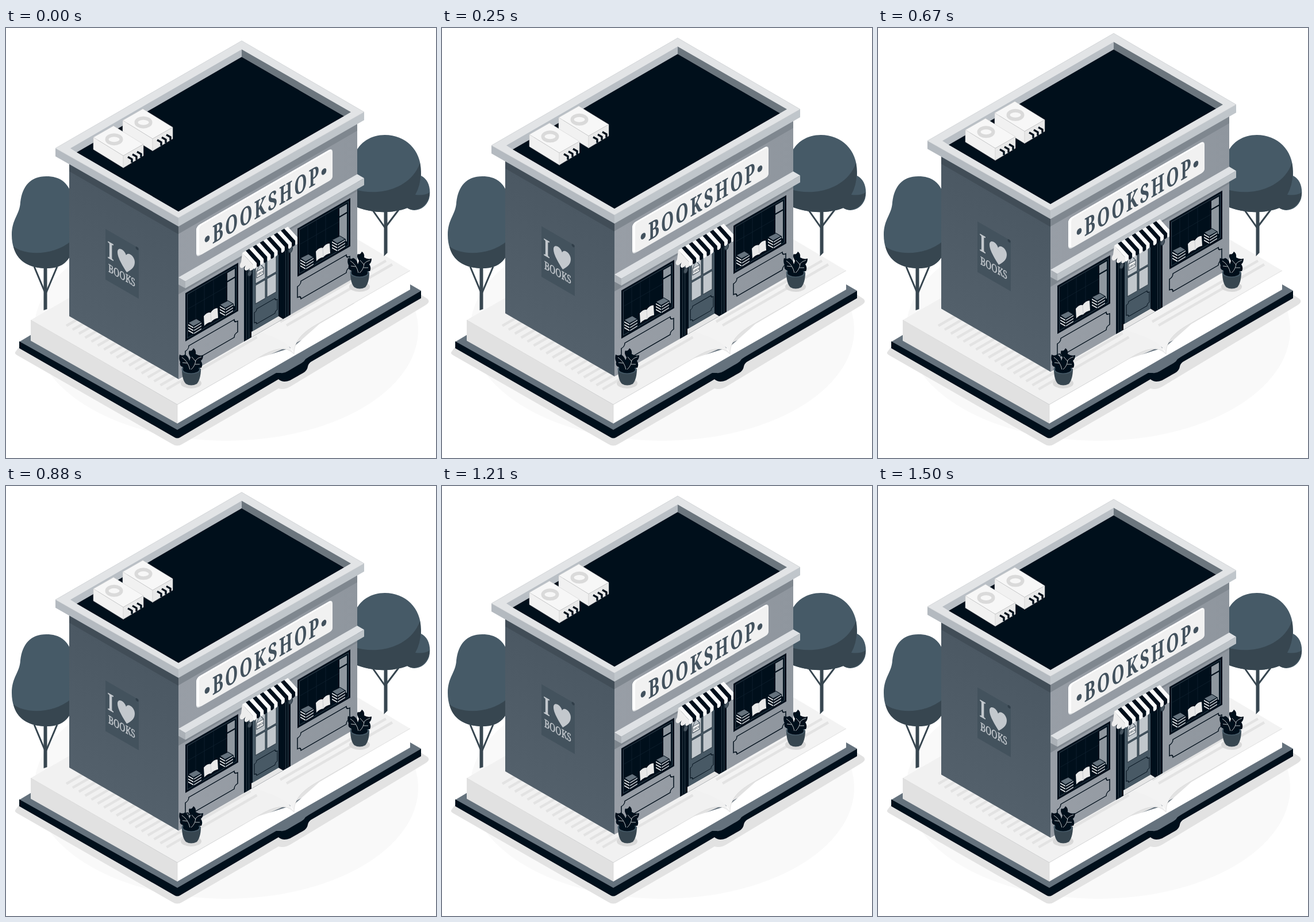
Animation of 748 by 748 pixels, one loop 1540 ms. Source, as an HTML page:

```html
<!DOCTYPE html>
<html lang="en">
<head>
<meta charset="utf-8">
<title>Bookshop</title>
<style>
  html, body { margin: 0; height: 100%; overflow: hidden; background: #fff; }
  svg { display: block; width: 100%; height: 100%; }
  text { font-family: "Noto Serif", "Liberation Serif", serif; }
  .ink { fill: #000f1b; }
  .slate { fill: #465a67; }
  .deep { fill: #374650; }
  .line { fill: none; stroke: #000f1b; stroke-width: 1.5; }
  .twig { fill: none; stroke: #374650; stroke-width: 3; }
</style>
</head>
<body>
<svg viewBox="0 0 748 748">
  <defs>
    <linearGradient id="side" x1="0" y1="0" x2="0" y2="1">
      <stop offset="0" stop-color="#4b5863"/><stop offset="1" stop-color="#53606b"/>
    </linearGradient>
    <linearGradient id="front" x1="0" x2="1">
      <stop offset="0" stop-color="#989ea6"/><stop offset="1" stop-color="#8f969e"/>
    </linearGradient>

    <g id="unit" stroke="#c9c9c9" stroke-width=".5">
      <path fill="#f7f7f7" d="M152 191L187 171 239 203 204 223z"/>
      <path fill="#f1f1f1" d="M152 191L204 223V244L152 212z"/>
      <path fill="#e9e9e9" d="M204 223L239 203V223L204 244z"/>
      <ellipse cx="188" cy="194.500" rx="12.500" ry="7.500" fill="none" stroke="#dadada" stroke-width="6"/>
      <path fill="none" stroke="#000f1b" stroke-width="3.400" d="M212 225l7 4v6M220 220.500l7 4v6M228 216l7 4v6"/>
    </g>

    <g id="plant">
      <ellipse cx="322" cy="618" rx="18" ry="9" fill="#d9d9d9"/>
      <path class="deep" d="M306 593C306 607 309 615 313 619Q322 624 332 619C336 614 339 606 339 593z"/>
      <ellipse class="slate" cx="322" cy="594" rx="16.500" ry="8"/>
      <ellipse class="ink" cx="322" cy="594" rx="14" ry="6.500"/>
      <path class="ink" d="M320 595Q309 598 308 590Q301 588 303 581Q300 575 302 568Q307 571 311 568Q318 571 319 579L321 573Q316 565 319 561Q323 563 326 557Q331 560 330 567Q336 571 343 569Q343 576 339 579Q343 585 340 591Q330 590 325 598z"/>
      <path d="M320 594Q317 580 306 573M315 583l-8-1M322 594Q329 588 330 578 333 574 340 572M330 580l-7-8M329 585l8 0" fill="none" stroke="#e8e8e8" stroke-width=".8"/>
    </g>

    <g id="book">
      <path class="ink" d="M316 524L331 516 341 522V526L326 535 316 529z"/>
      <path fill="#e3e6e8" d="M317 526l9 5v2l-9-5z"/>
      <path fill="#b4bac0" d="M327 531l13-8v2l-13 8z"/>
    </g>
    <g id="books">
      <use href="#book"/>
      <use href="#book" y="-5"/>
      <use href="#book" y="-10"/>
      <path fill="#65727d" d="M318 513.500L331 507 339 512 326 519z"/>
    </g>

    <g id="window">
      <g transform="matrix(1 -.577 0 1 300 346)">
        <path class="ink" d="M12 123h92v84h-92z"/>
        <path fill="none" stroke="#34434f" d="M15.500 127h85v76h-85z"/>
        <path stroke="#102230" stroke-width=".8" d="M30 128v74M45 128v74M61 128v74M17 153h68"/>
        <path fill="#8f979f" d="M85 130h13v65L85 184z"/>
        <path stroke="#000f1b" stroke-width="2.500" d="M85 145h14"/>
        <path class="line" d="M18 218h79q0 6 6 6v19q-6 0-6 6h-79q0-6-6-6v-19q6 0 6-6z"/>
      </g>
      <use href="#books"/>
      <path class="ink" d="M344 504L369 489V508L345 522z"/>
      <path fill="#e9e9e9" d="M344 502Q351 494 356 496 361 488 368 488L369 505Q361 507 357 512 350 513 345 519z"/>
      <path stroke="#b9bec3" stroke-width=".7" d="M356 496l1 16"/>
      <use href="#books" x="55" y="-31.500"/>
    </g>

    <path id="stripe" d="M111 110h6.100l19 32v5a3.050 3.050 0 0 1-6.100 0v-5z"/>
  </defs>

  <!-- ground and open book -->
  <ellipse cx="383" cy="525" rx="334" ry="193" fill="#f9f9f9"/>
  <path fill="#e2e2e2" d="M24 553L16 564Q15 567 19 569L288 723Q298 730 308 723L474 627Q484 630 494 624L524 606 730 482Q739 476 733 471L722 464z"/>
  <path fill="#65727d" d="M23 546L43 534 298 640 500 550 703 446 722 457 527 574 490 604 470 602 298 700z"/>
  <path class="ink" d="M23 545L298 699 470 600 478 600Q484 601 490 597L514 583Q519 580 521 576L527 572 722 457V470L530 581Q526 584 525 589 524 596 517 600L494 613Q482 618 474 611L303 712Q298 715 293 712L23 557z"/>
  <path fill="#e1e1e1" d="M43 508L298 655V688L43 544z"/>
  <path fill="#fff" d="M298 655L437 575 500 555 545 515 703 422V455L500 571 298 688z"/>
  <path fill="#f1f1f1" d="M43 508L300 360 470 520 501 567Q482 546 437 575L298 655z"/>
  <path fill="#f3f3f3" d="M430 505L612 368 703 422 540 516C515 530 501 545 501 567Q496 545 430 525z"/>
  <path fill="none" stroke="#d6d6d6" stroke-width=".7" d="M43 508L298 655 437 575Q482 546 501 567C501 545 515 530 540 516L703 422M298 655V688"/>
  <g id="print" stroke="#e3e3e3" stroke-width="4.500"></g>

  <!-- trees -->
  <path class="twig" d="M49 415L67 458M89 415L70 460"/>
  <path class="deep" d="M65.500 491V418h6v71z"/>
  <path class="slate" d="M70 258C43 258 28 275 25 303 24 325 10 332 10 360 10 396 32 418 70 418 95 418 106 408 114 392V288C106 268 94 258 70 258z"/>
  <path class="deep" d="M13 380C33 396 82 397 114 370V393C105 410 94 418 70 418 39 418 18 404 13 380z"/>
  <path class="twig" d="M635 313L659 347M684 315L662 344"/>
  <path class="deep" d="M657.500 397V306h6v85z"/>
  <path class="slate" d="M606 222C614 198 636 186 659 186 695 186 722 212 722 250V257C735 263 740 280 736 297 730 315 711 322 698 313 670 324 632 322 604 309z"/>
  <path class="deep" d="M604 280C650 295 705 278 720 235Q725 267 712 290 728 292 737 286C736 308 715 323 698 313 670 324 632 322 604 309z"/>

  <g id="shop">
    <!-- side wall -->
    <g transform="matrix(1 .577 0 1 110 238)">
      <path fill="url(#side)" d="M0 0h190v264H0z"/>
      <path fill="#414d57" d="M0-4h190v16H0z"/>
      <path fill="#43525d" d="M63 76h58v88h-58z"/>
      <circle cx="118" cy="78" r="2.500" fill="#303e49"/>
      <g fill="#c3c8cd">
        <text transform="translate(66.500 124) scale(.68 1)" font-size="41" font-weight="700">I</text>
        <path d="M100 130C88 118 84 111 84 104 84 94 96 92 99 101 102 92 114 94 114 104 114 112 110 119 100 130z"/>
        <text transform="translate(68 147) scale(.73 1)" font-size="19" stroke="#c3c8cd" stroke-width=".5">BOOKS</text>
      </g>
    </g>

    <!-- facade -->
    <g transform="matrix(1 -.577 0 1 300 346)">
      <path fill="url(#front)" d="M0 0h311v266H0z"/>
      <path fill="#7f878f" d="M0-4h311v17H0zM0 101h311v17H0z"/>
      <rect x="31" y="18" width="237" height="54" rx="6" fill="#dcdfe1"/>
      <rect x="31" y="18" width="236" height="52" rx="6" fill="#fff"/>
      <rect x="36" y="21" width="232" height="51" rx="5" fill="#f1f1f1"/>
      <g fill="#43525e">
        <ellipse cx="50" cy="50.500" rx="4.300" ry="5.200"/>
        <ellipse cx="253" cy="50.500" rx="4.300" ry="5.200"/>
        <text transform="translate(59 64.500) scale(.66 1)" font-size="43" font-weight="600" letter-spacing="4.500">BOOKSHOP</text>
      </g>
      <path fill="#dfe2e5" d="M0 88.500h311l12 14H12z"/>
      <path fill="#bdc3c8" d="M12 102.500h311v12H12z"/>
      <path fill="#abb1b7" d="M0 88.500l12 14v12L0 101z"/>
      <!-- entrance -->
      <path class="ink" d="M114 118h81v148h-81z"/>
      <path fill="#e6e6e6" d="M127 266h55l-8-9.500h-47z"/>
      <path fill="#2a3843" d="M118 125h1.200v141h-1.200zM122 125h1.200v141h-1.200zM186 125h1.200v141h-1.200zM190 125h1.200v141h-1.200z"/>
      <path fill="#485965" d="M129 130h45v126.500h-45z"/>
      <path fill="#c1c7cc" stroke="#2a3843" d="M134 142h17v35h-17zM154 142h16v35h-16zM134 180h17v32h-17zM154 180h16v32h-16z"/>
      <path class="line" style="stroke-width: 1" d="M136 222h32q0 4 4 4v18q-4 0-4 4h-32q0-4-4-4v-18q4 0 4-4z"/>
      <path fill="none" stroke="#34434f" stroke-width=".8" d="M136 157l6-10 6 10"/>
      <path fill="#f0f0f0" stroke="#34434f" d="M136 157h12v11h-12z"/>
      <text transform="translate(137 165) scale(.72 1)" font-size="5.200" font-weight="700" fill="#34434f">OPEN</text>
      <g fill="#485560" stroke="#1c2a35">
        <path d="M121 143h4v6h-4zM192 143h4v6h-4z"/>
        <ellipse cx="124" cy="153" rx="3.500" ry="5"/><ellipse cx="195" cy="153" rx="3.500" ry="5"/>
      </g>
      <path fill="#ededed" d="M111 110L130 142V149a4 4 0 0 1-6-5 4 4 0 0 1-7-9 4 4 0 0 1-8-10z"/>
      <g id="awning"></g>
    </g>
    <use href="#window"/>
    <use href="#window" x="195" y="-112.500"/>

    <!-- roof -->
    <path fill="#b4bac0" d="M86 210L300 331V346L86 224z"/>
    <path fill="#c0c6cb" d="M300 331L623 147V161L300 346z"/>
    <path fill="#e2e4e6" stroke="#b8bcc0" stroke-width=".5" d="M86 210L410 23 623 147 300 331z"/>
    <path fill="#b9bfc5" d="M112 210L410 38V51L123 217z"/>
    <path fill="#6c767e" d="M410 38L600 147 588 154 410 51z"/>
    <path class="ink" d="M123 217L410 51 588 154 300 320z"/>
    <use href="#unit" x="51" y="-29.500"/>
    <use href="#unit"/>
  </g>

  <use href="#plant"/>
  <use href="#plant" x="293" y="-168"/>
</svg>
<script>
  const find = id => document.getElementById(id);
  const repeat = (count, draw) => Array.from({ length: count }, (_, i) => draw(i)).join('');
  const printLine = (x, y, length) => `<path d="M${x} ${y}l${length} ${-.577 * length}"/>`;

  find('print').innerHTML =
    repeat(17, i => printLine(105 + i * 10.9, 518 + i * 6.9, 157)) +
    repeat(2, i => printLine(477 + i * 11, 511 + i * 6.4, 184));

  find('awning').innerHTML = repeat(13, i =>
    `<use href="#stripe" x="${i * 6.1}" fill="${i % 2 ? '#000f1b' : '#fafafa'}"/>`);

  const LOOP = 1540, STEPS = 37, RISE = 14.96;
  const shop = find('shop');

  // The shop floats up and down at constant speed, about 24 steps a second.
  function frame() {
    const step = Math.floor(performance.now() % LOOP / LOOP * STEPS + .1) + 1;
    const phase = step / STEPS % 1;
    const lift = RISE * (1 - Math.abs(1 - 2 * phase));
    shop.setAttribute('transform', `translate(0 ${-lift})`);
    requestAnimationFrame(frame);
  }
  frame();
</script>
</body>
</html>
```
